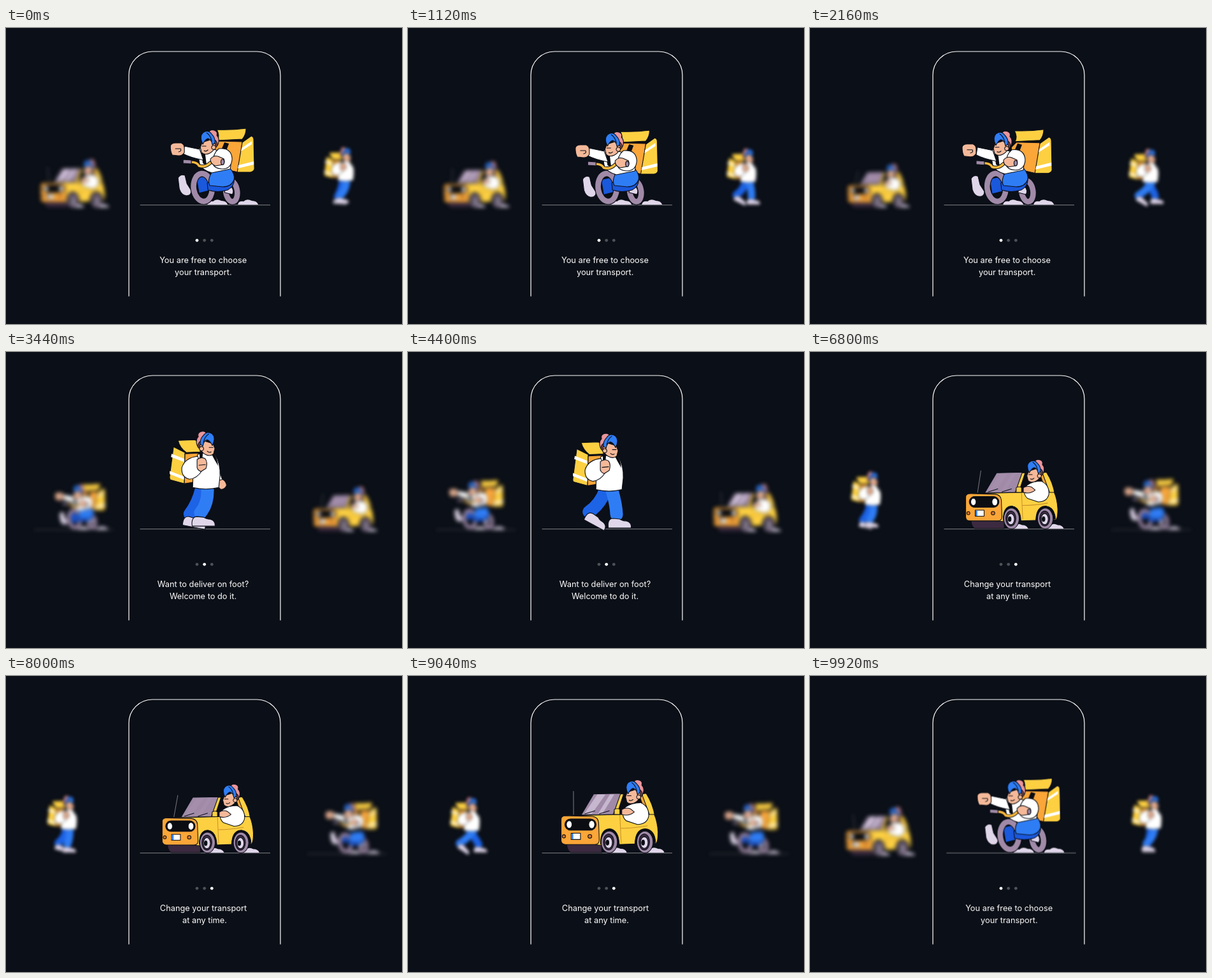
Write an HTML page that moves like this. It is 622 px wide and 466 px high and loops after 10000 ms.

```html
<!DOCTYPE html>
<html lang="en">
<head>
<meta charset="utf-8">
<title>Delivery onboarding</title>
<style>
html, body { margin: 0; width: 100%; height: 100%; overflow: hidden; background: #0b0f17; }
svg { display: block; width: 622px; height: 466px; }
.art { stroke: #0b0f17; stroke-width: 1.1; stroke-linejoin: round; stroke-linecap: round; }
.y { fill: #fdd042 } .o { fill: #faa638 } .b { fill: #2f7df5 } .db { fill: #1a58dc }
.w { fill: #fff } .l { fill: #e0d6ea } .v { fill: #a08aa8 } .s { fill: #f5b999 }
.p { fill: #e9959b } .m { fill: #7b4548 } .k { fill: #0b0d12 } .u { fill: #3b2a40 }
.n { fill: none } .flat { stroke: none }
.ground { stroke: #6a6b71; stroke-width: 1.2; }
.tire { fill: none; stroke: #a08aa8; stroke-width: 8.6; }
.rim { fill: none; stroke: #0b0f17; stroke-width: 10.8; }
.leg { fill: none; stroke: #2f7df5; stroke-width: 20; }
.leg.far { stroke: #1d63e6; }
text { font: 400 12.8px Inter, "Open Sans", sans-serif; fill: #fff; text-anchor: middle; }
</style>
</head>
<body>
<svg viewBox="0 0 622 466">
  <defs>
    <g id="head">
      <path class="p" d="M0-22q2-6 9-4q6 2 4 8q5 5 2 14l-6 6-9-14z"/>
      <path class="m" d="M7-12q7 2 7 10l-5 6-6-5z"/>
      <path class="s" d="M-10-7q-2 5-3 8 1 3 2 8q5 5 13 1q8-4 9-14l-8-7z"/>
      <circle class="s" cx="8" cy="1" r="3.3"/>
      <path class="b" d="M-9-4q-6-12 0-18q8-6 14 2q6 6 5 14l-4 3q-2-10-7-10q-4 1-8 9z"/>
      <path class="n" d="M-10-1h6M-7 6q3 2 6-1M-3-22q6 4 8 13"/>
    </g>
    <path id="shoe" class="l" d="M-18 0q-2-15 8-15l10 1q4 3 10 3q9 2 8 11z"/>
    <path id="puff" class="l flat" d="M0 0q1-6 9-5q5-5 13-1q8 0 10 6z"/>
    <g id="wheel">
      <ellipse class="v" rx="13" ry="17.5"/><ellipse class="u" cx="-1" rx="8.5" ry="12.8"/>
      <ellipse class="l" cx="-1" cy="1" rx="6" ry="9.3"/><ellipse class="k" cx="-3" cy="1" rx="2.4" ry="4"/>
    </g>
  </defs>

  <g class="slide">
    <path class="ground" d="M210.5 278.7H415"/>
    <g class="art">
      <g id="wheels">
        <use href="#puff" x="316" y="278"/><use href="#puff" x="364" y="278"/>
        <g transform="rotate(-8 354 257)">
          <ellipse class="rim" cx="354" cy="257" rx="9" ry="16.5"/>
          <ellipse class="tire" cx="354" cy="257" rx="9" ry="16.5"/>
        </g>
      </g>
      <g id="bag">
        <path class="k" d="M327 180l9-8 38 0 10-2-10 14-46 6z"/>
        <path class="o" d="M326 186l8-8 37 1-7 48-34-8z"/>
        <path class="y" d="M371 180l14-10q4 1 4 6l1 46q-1 4-6 5l-21 0z"/>
        <path class="w flat" d="M370 189l16-11v5l-17 11zM365 216l24-6v5l-25 6z"/>
        <path class="y" d="M331 160q23 1 46-2q0 10-6 17l-39 2q4-8-1-17z"/>
      </g>
      <g id="kick">
        <path class="db" d="M299 236l20-4 8 22-24 6z"/>
        <path class="l" d="M270 236q4-7 11-4l3 13 7 11q0 8-8 8-8-1-11-11z"/>
      </g>
      <g id="front">
        <g transform="rotate(-6 309 251)">
          <ellipse class="rim" cx="309" cy="251" rx="14.5" ry="22"/>
          <ellipse class="tire" cx="309" cy="251" rx="14.5" ry="22"/>
        </g>
        <path class="l" d="M345 248l9 2q5 7 1 12l-12-3z"/>
        <path class="db" d="M316 244q14-8 42-9q2 14-10 20-16 5-31 0z"/>
        <path class="b" d="M325 224l27-3q8 10 6 18-4 11-18 11l-20-2q-5-9 5-24z"/>
      </g>
      <g id="rider">
        <path class="w" d="M300 191q10-4 26 0l22 6q7 12 4 25l-29 6q-15-4-19-14z"/>
        <path class="k flat" d="M306 191l6 2 3 24-6-4zM343 180l7 2-6 16-7-4z"/>
        <path class="w" d="M280 186l24 5 6 17q-21-4-32-10z"/>
        <path id="fist" class="s" d="M258 186q1-5 8-5h9q5 2 5 8v7q-4 6-10 5l-9-1q-3-5-3-14zM266 190h8q2 4-3 5"/>
        <path class="n" style="stroke-width:5.5" d="M290 211q10 0 13 6 10 3 18-5"/>
        <path class="n" style="stroke:#fbb93c;stroke-width:3.6" d="M290 211q10 0 13 6 10 3 18-5"/>
        <path class="v" d="M278 207l13 1v6l-13-1z"/>
        <use href="#head" x="318" y="187"/>
        <path class="w" d="M334 190q20-2 21 16q-1 16-16 16-12-1-14-8q-1-16 9-24z"/>
        <path class="s" d="M321 206q5-6 12-4l9 4q2 6-1 9l-12 2q-9-3-8-11z"/>
        <ellipse class="v" cx="340" cy="211" rx="2.6" ry="4.2"/>
      </g>
    </g>
  </g>

  <g class="slide">
    <path class="ground fade" d="M210.5 278.7H415"/>
    <g class="art">
      <g id="hand" class="fade">
        <path class="w" d="M328 184l8 0 6 18-9 5z"/>
        <path class="s" d="M335 202l7-2q6 4 6 10-3 6-9 6-7-5-4-14z"/>
      </g>
      <path class="leg far"/><use href="#shoe"/>
      <path class="leg"/><use href="#shoe"/>
      <g id="walker">
        <path class="k" d="M264 148l8-6 28 10 6 6-24 8z"/>
        <path class="y" d="M263 148l18 9-1 49-22-6q-2-2-1-6z"/>
        <path class="w flat" d="M260 159l20 8v5l-21-8zM257 186l23 9v5l-23-9z"/>
        <path class="o" d="M281 159l22-1 2 44-25 4z"/>
        <path class="y" d="M270 138l27-1q8 5 8 19l-22 1q-10-7-13-19z"/>
        <path class="w" d="M301 160q12-4 27 0 9 14 8 34l-2 18q-20 5-41 0l1-30z"/>
        <path class="k flat" d="M304 157l5 1-1 13-4 2zM326 158q6 7 7 20-6-10-10-18z"/>
        <path class="w" d="M301 163q-20 2-25 18-1 15 12 18 12-1 20-14z"/>
        <path class="s" d="M300 168q7-5 13-1 4 6 1 15l-8 5q-7-3-6-9zM303 177l10-1"/>
        <use href="#head" transform="translate(315 150) scale(-1 1)"/>
      </g>
    </g>
  </g>

  <g class="slide">
    <path class="ground fade" d="M210.5 278.7H415"/>
    <g class="art" id="car">
      <use href="#puff" x="312" y="278"/><use href="#puff" x="372" y="278"/>
      <path id="antenna" d="M259 217L257 180" stroke="#77757c"/>
      <path class="u" d="M248 262h56v16h-50q-6-4-6-16z"/>
      <path class="k" d="M333 184H368L386 219H322z"/>
      <path class="v" d="M291 184l44-1-12 34-52 1z"/>
      <path id="shine" class="l flat" d="M297 185h13l-22 31h-12zM317 185h7l-19 31h-7z"/>
      <path class="n" d="M277 216l16-5M300 216l16-5"/>
      <path class="y" d="M334 184h5l-11 34h-6z"/>
      <path class="o" d="M363 184h6l15 36h-8z"/>
      <path class="y" d="M368 184l7-1q11 17 14 37l-7 2z"/>
      <path class="y" d="M246 219L333 217H388Q393 228 394 245Q394 260 391 263L300 266 263 262z"/>
      <path class="o" d="M239 225q0-6 8-6l42 1q9 1 10 10l1 28q0 7-7 7h-47q-6 0-7-6z"/>
      <rect class="k" x="245" y="224" width="50" height="18" rx="9"/>
      <ellipse class="w" cx="252" cy="233" rx="4.5" ry="6.2"/><ellipse class="w" cx="288" cy="233" rx="4.8" ry="6.5"/>
      <circle cx="243.5" cy="252" r="2.6" fill="#d77929"/><circle cx="285" cy="252" r="3" fill="#d77929"/>
      <rect class="w" x="255" y="247" width="15" height="10"/><path class="b flat" d="M255.5 247.5h3v9h-3z"/>
      <path class="n" d="M333 218l2 44M335 239q20 0 42-4" stroke="#c99327"/>
      <path class="y" d="M324 209q5-3 9 0v8h-9z"/>
      <use href="#head" x="355" y="188"/>
      <path class="w" d="M342 205q10-7 24-7 14 6 13 22-3 13-18 13l-18-6q-10-9-1-22z"/>
      <path class="s" d="M336 209q7-4 14-1l6 5q-8 7-20 4z"/>
      <path class="k" d="M302 264q0-24 15-24 14 2 15 25zM357 264q1-24 17-24 15 2 16 22z"/>
      <use href="#wheel" x="316" y="261"/><use href="#wheel" x="373" y="261"/>
    </g>
  </g>

  <g class="copy"><text x="309.5" y="370">You are free to choose</text><text x="309.7" y="389">your transport.</text></g>
  <g class="copy"><text x="309.5" y="370">Want to deliver on foot?</text><text x="309.5" y="389">Welcome to do it.</text></g>
  <g class="copy"><text x="310" y="370">Change your transport</text><text x="312" y="389">at any time.</text></g>

  <path d="M193 422.5V74a37 37 0 0 1 37-37H394a37 37 0 0 1 37 37V422.5" fill="none" stroke="#fff" stroke-width="1.2"/>
  <g fill="#fff">
    <circle class="dot" cx="300" cy="334.3" r="2.4"/><circle class="dot" cx="311.7" cy="334.3" r="2.4"/><circle class="dot" cx="323.3" cy="334.3" r="2.4"/>
  </g>
</svg>
<script>
const LOOP = 10000, MOVE = 750, STARTS = [2300, 4750, 9325], TAU = Math.PI * 2;
// Resting place of each slide beside the phone.
const SIDES = [
  { left: 106, right: 535, scale: .615, floor: 280, blur: 5.2 },
  { left: 97, right: 532, scale: .59, floor: 279, blur: 4.2 },
  { left: 102, right: 527, scale: .64, floor: 283, blur: 5.2 },
];
const all = (q, root = document) => [...root.querySelectorAll(q)];
const set = (el, attrs) => { for (const k in attrs) el.setAttribute(k, attrs[k]); };
const place = (id, x, y, more = '') => set(document.getElementById(id), { transform: `translate(${x} ${y}) ${more}` });
const slides = all('.slide'), copies = all('.copy'), dots = all('.dot');
const legs = all('.leg'), shoes = all('.leg + use');

const ease = p => p <= 0 ? 0 : p >= 1 ? 1 : p < .5 ? 8 * p ** 4 : 1 - 8 * (1 - p) ** 4;

// Smooth looping interpolation through [phase, value] pairs.
function keyed(phase, keys) {
  let i = keys.length - 1;
  while (i > 0 && keys[i][0] > phase) i--;
  const [a, from] = keys[i], [b, to] = keys[i + 1] || [1, keys[0][1]];
  const u = (phase - a) / (b - a);
  return from + (to - from) * u * u * (3 - 2 * u);
}

const SWAY = [[0, 0], [.2, 0], [.376, 6], [.76, -12], [.864, -17], [.968, 1]];

function carousel(t) {
  const pos = STARTS.reduce((sum, s) => sum + ease((t - s) / MOVE), ease((t + LOOP - STARTS[2]) / MOVE) - 1);
  slides.forEach((slide, i) => {
    const side = SIDES[i], d = ((i - pos + 4.5) % 3) - 1.5, dist = Math.abs(d), near = Math.min(1, dist);
    const step = d < 0 ? 312 - side.left : side.right - 312;
    const x = d * step + Math.sign(d) * Math.max(0, dist - 1) * 220;
    const floor = 279 + (side.floor - 279) * near, scale = 1 + (side.scale - 1) * near;
    set(slide, { transform: `translate(${312 + x} ${floor}) scale(${scale}) translate(-312 -279)` });
    slide.style.filter = near > .004 ? `blur(${side.blur * near}px)` : 'none';
    all('.fade', slide).forEach(el => set(el, { opacity: 1 - near }));
    set(copies[i], { transform: `translate(${x} 0)`, opacity: Math.max(0, 1 - 2 * dist) });
    set(dots[i], { opacity: .28 + .72 * (1 - near) });
  });
}

function ride(t) {
  const phase = t / 2500 % 1, x = keyed(phase, SWAY);
  const y = -4 + 7.5 * Math.cos(2 * TAU * (phase - .92));
  place('wheels', x * .75, 0);
  place('front', x * .95, 0);
  place('kick', x, y * .8);
  place('bag', x * .58, y);
  place('rider', x, y);
  place('fist', x * .12, 0);
}

function walk(t) {
  const phi = Math.PI * (t * 6 / LOOP + .04), beat = Math.cos(2 * phi);
  place('walker', 1.4 - 1.6 * beat, 3.4 - 2.8 * beat);
  place('hand', -8 + 8 * beat, 2 - 2 * beat);
  [-1, 1].forEach((side, i) => {
    const swing = side * Math.sin(phi), lift = Math.max(0, side * Math.cos(phi)) * 3;
    const heel = Math.max(0, -swing) * 34;
    const x = 309 - 8 * beat + 24 * swing, y = 277 - lift - heel * .1;
    const hip = 314 + side * 5 - 3 * beat, ankle = x - 5 - heel * .1;
    const knee = (hip + ankle) / 2 + 3 + lift;
    set(legs[i], { d: `M${hip} 217Q${knee} 240 ${ankle} ${y - 21}` });
    set(shoes[i], { transform: `translate(${x} ${y}) rotate(${heel})` });
  });
}

function drive(t) {
  const wave = Math.cos(t / 5000 * TAU), s = .965 + .05 * wave;
  place('car', 322, 278, `scale(${s}) translate(-322 -278)`);
  place('antenna', 0, 0, `rotate(${6 - 9 * wave} 259 217)`);
  set(document.getElementById('shine'), { opacity: Math.max(.05, Math.min(.8, .35 + .7 * wave)) });
}

function frame(now) {
  const t = now % LOOP;
  carousel(t);
  ride(t);
  walk(t);
  drive(t);
  requestAnimationFrame(frame);
}
requestAnimationFrame(frame);
</script>
</body>
</html>
```
